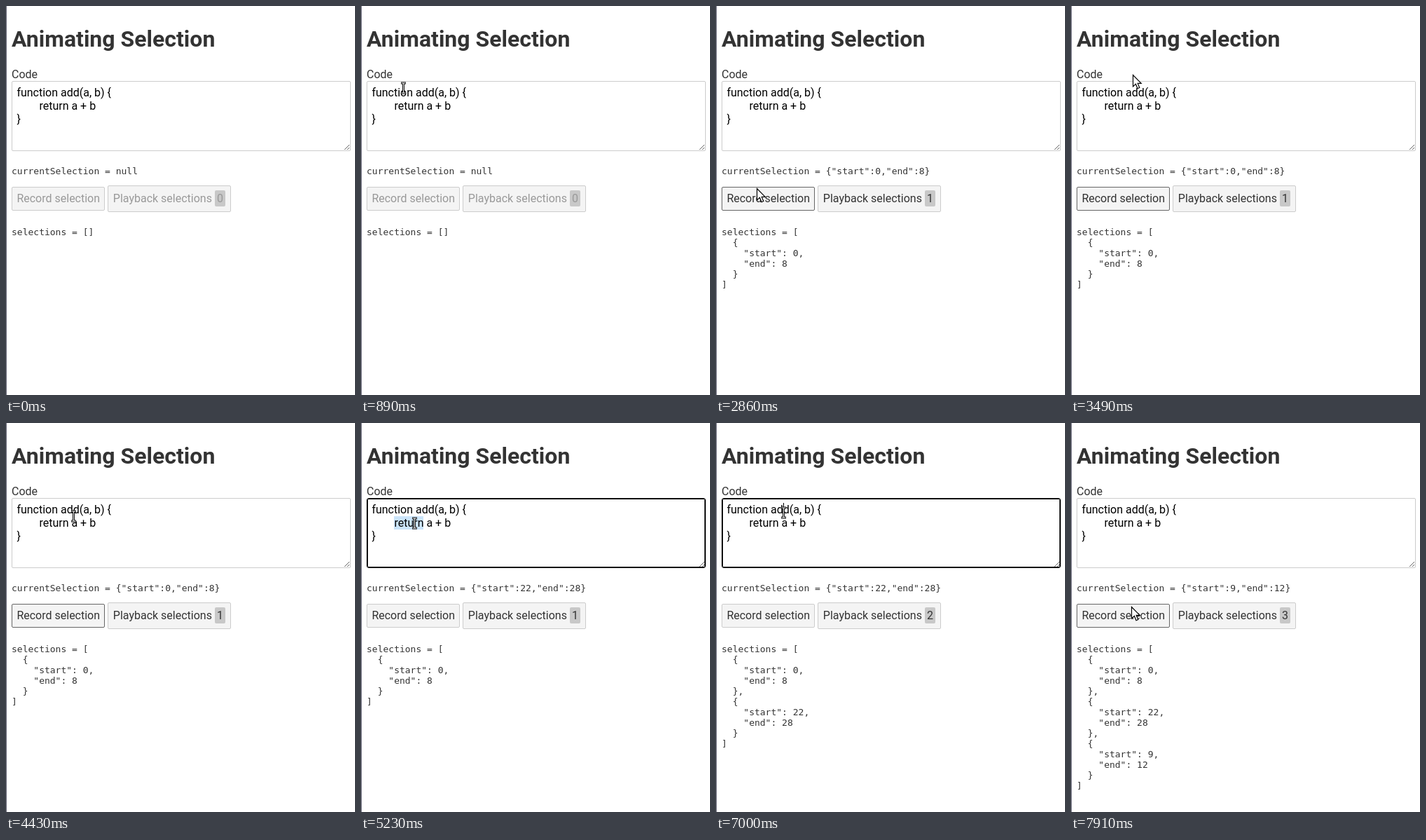
Animation of 498 by 555 pixels, one loop 8 s. Source, as an HTML page:

```html
<!DOCTYPE html>
<html lang="en">
<head>
<meta charset="utf-8">
<title>Animating Selection</title>
<style>
  html, body { margin: 0; width: 100%; height: 100%; overflow: hidden; background: #fff; }
  body { position: relative; color: #333; font: 16px Roboto, sans-serif; }
  body > * { position: absolute; left: 8px; box-sizing: border-box; margin: 0; white-space: pre; }
  body > .edge { left: 0; top: 0; width: 1px; height: 100%; background: #676778; }
  h1 { top: 28px; font-size: 32px; line-height: 38px; }
  .label { top: 88px; line-height: 19px; }
  pre { font: 13px/15px "DejaVu Sans Mono", monospace; }
  #current { top: 228px; }
  #list { top: 315px; }

  #code { top: 107px; width: 484px; height: 100px; padding: .4em; overflow: hidden; resize: vertical;
    border: 1px solid #ccc; border-radius: 2px; color: #000; line-height: 19px; tab-size: 32px; }
  #code.focus { box-shadow: inset 0 0 0 1px #101010; border-color: #101010; border-radius: 3px; }
  #code mark { background: #cbe4fa; color: inherit; }
  #code i { position: absolute; width: 1px; height: 19px; background: #000; }

  .row { top: 256px; height: 38px; display: flex; align-items: center; gap: .248em; }
  .button { padding: 0 .4em; background: #f4f4f4; border: 1px solid #ccc; border-radius: 2px; }
  .button.focus { border-color: #666; }
  .button.off { color: #999; }
  #record { line-height: 32px; }
  #play { line-height: 36px; }
  #count { display: inline-block; padding: 0 .2em; line-height: 23px; background: #c8c8c8; border-radius: 2px; }
  body > #pointer { left: 0; top: 0; overflow: visible; }
</style>
</head>
<body>
<div class="edge"></div>
<h1>Animating Selection</h1>
<div class="label">Code</div>
<div id="code"></div>
<pre id="current"></pre>
<div class="row"><div id="record" class="button">Record selection</div><div id="play" class="button">Playback selections <span id="count"></span></div></div>
<pre id="list"></pre>
<svg id="pointer" width="1" height="1">
  <path id="arrow" d="M.5.5V17L4.4 13.4 7 19.7 9.8 18.5 7.2 12.4H12.2Z" fill="#fff" stroke="#000" stroke-width="1.2"/>
  <g id="beam" fill="none">
    <path id="stem" d="M-3 -7H4M.5 -7V7M-3 7H4" stroke="#000" stroke-width="3"/>
    <use href="#stem" style="display:none"/>
    <path d="M-2.5 -7H3.5M.5 -7V7M-2.5 7H3.5" stroke="#fff"/>
  </g>
</svg>
<script>
const LOOP = 8000;
const CODE = 'function add(a, b) {\n\treturn a + b\n}';

// Each round: press in the code, select a word, record it.
const ROUNDS = [
  { word: 'function', press: 1230, select: 1490, record: 2600 },
  { word: 'return', press: 5030, select: 5230, record: 6000 },
  { word: 'add', press: 7000, select: 7200, record: 7910 },
];
for (const round of ROUNDS) {
  const start = CODE.indexOf(round.word);
  round.range = { start, end: start + round.word.length };
}

// Each glide runs from the previous stop; bow bends it to the right.
const ENTRY = { x: 3, y: 222 };
const GLIDES = [
  { leave: 60, arrive: 710, x: 79, y: 122, bow: 105 },
  { leave: 860, arrive: 890, x: 60, y: 117 },
  { leave: 890, arrive: 1090, x: 53, y: 121 },
  { leave: 1490, arrive: 1770, x: 50, y: 258 },
  { leave: 2060, arrive: 2260, x: 56, y: 273 },
  { leave: 2830, arrive: 2860, x: 58, y: 260 },
  { leave: 2860, arrive: 3490, x: 88, y: 98 },
  { leave: 3600, arrive: 3770, x: 104, y: 117 },
  { leave: 3880, arrive: 4060, x: 92, y: 112 },
  { leave: 4260, arrive: 4430, x: 96, y: 133 },
  { leave: 4430, arrive: 4800, x: 76, y: 143 },
  { leave: 5230, arrive: 5570, x: 82, y: 275 },
  { leave: 6000, arrive: 6600, x: 96, y: 128 },
  { leave: 7230, arrive: 7830, x: 86, y: 262 },
];

const $ = id => document.getElementById(id);
const mix = (a, b, p) => a + (b - a) * p;

function codeMarkup(round, selected) {
  if (!round) return CODE;
  const { start, end } = round.range;
  const caret = start + Math.ceil((end - start) * 0.6);
  return selected
    ? CODE.slice(0, start) + `<mark>${round.word}</mark>` + CODE.slice(end)
    : CODE.slice(0, caret) + '<i></i>' + CODE.slice(caret);
}

let shown;
function showState(t) {
  const count = step => ROUNDS.filter(round => round[step] <= t).length;
  const pressed = count('press'), selected = count('select'), recorded = count('record');
  const key = [pressed, selected, recorded].join();
  if (key === shown) return;
  shown = key;

  const editing = pressed > recorded;
  const current = selected ? ROUNDS[selected - 1].range : null;
  const list = ROUNDS.slice(0, recorded).map(round => round.range);
  $('code').innerHTML = codeMarkup(editing && ROUNDS[pressed - 1], selected === pressed);
  $('code').classList.toggle('focus', editing);
  $('record').classList.toggle('focus', !editing && recorded > 0);
  $('record').classList.toggle('off', !selected);
  $('play').classList.toggle('off', !recorded);
  $('count').textContent = recorded;
  $('current').textContent = 'currentSelection = ' + JSON.stringify(current);
  $('list').textContent = 'selections = ' + JSON.stringify(list, null, 2);
}

function showPointer(t) {
  const i = GLIDES.filter(glide => glide.leave <= t).length - 1;
  $('pointer').style.display = i < 0 ? 'none' : '';
  if (i < 0) return;
  const from = GLIDES[i - 1] || ENTRY, to = GLIDES[i];
  const linear = Math.min(1, (t - to.leave) / (to.arrive - to.leave));
  const p = linear * linear * (3 - 2 * linear);
  const x = Math.round(mix(from.x, to.x, p) + (to.bow || 0) * 4 * p * (1 - p));
  const y = Math.round(mix(from.y, to.y, p));
  const overText = x >= 8 && (y >= 107 && y < 207 || y >= 228 && y < 243);
  $('beam').style.display = overText ? '' : 'none';
  $('arrow').style.display = overText ? 'none' : '';
  $('pointer').style.transform = `translate(${x}px, ${y}px)`;
}

const origin = performance.now();
function draw() {
  const t = (performance.now() - origin) % LOOP;
  showState(t);
  showPointer(t);
  requestAnimationFrame(draw);
}
draw();
</script>
</body>
</html>
```
